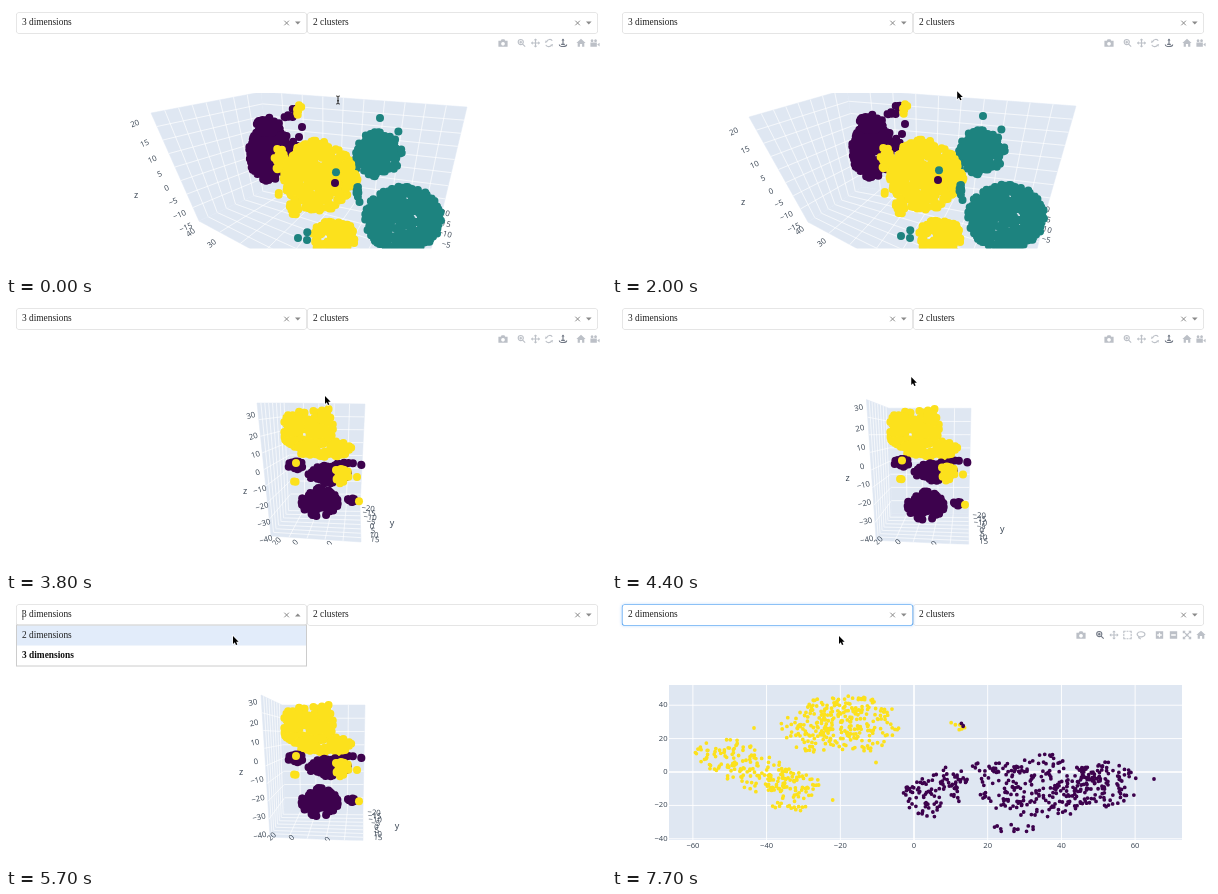
An HTML page with a canvas for the animation above (8 s loop, 600x268 px).

```html
<!DOCTYPE html>
<html lang="en">
<head>
<meta charset="utf-8">
<title>Cluster explorer</title>
<style>
  html, body { margin: 0; width: 100%; height: 100%; overflow: hidden; background: #fff; }
  canvas { display: block; }
</style>
</head>
<body>
<canvas id="stage" width="600" height="268"></canvas>
<script>
const g = document.getElementById('stage').getContext('2d');
const LOOP = 8000, SWAP = 2300, FLAT = 6900, OPEN = 4800, PICK = 5800;
const P = '#3d024d', Y = '#fce11c', T = '#1d837f', WALL = '#dfe7f2', INK = '#34404f';
const clamp = u => Math.max(0, Math.min(1, u));
const span = (t, a, b) => clamp((t - a) / (b - a));
const lerp = (a, b, u) => a + (b - a) * u;

let seed = 11;
function random() {
  seed = (seed * 1664525 + 1013904223) >>> 0;
  return seed / 4294967296;
}

// Unit-disc samples, enough of them to fill an ellipse of the given area
function cloud(area, power) {
  return Array.from({ length: 1 + Math.floor(area) }, () => {
    const a = random() * Math.PI * 2, r = random() ** power;
    return [r * Math.cos(a), r * Math.sin(a)];
  });
}

function discs(color, pts, x, y, rx, ry, r) {
  g.fillStyle = color;
  g.beginPath();
  for (const [dx, dy] of pts) {
    const px = x + dx * rx, py = y + dy * ry;
    g.moveTo(px + r, py);
    g.arc(px, py, r, 0, 7);
  }
  g.fill();
}

function text(str, x, y, font, color = INK, align = 'left', angle = 0) {
  g.save();
  g.translate(x, y);
  g.rotate(angle * Math.PI / 180);
  g.font = font;
  g.fillStyle = color;
  g.textAlign = align;
  g.textBaseline = 'middle';
  g.fillText(str, 0, 0);
  g.restore();
}
const SANS = '"Open Sans", sans-serif', SERIF = '"Liberation Serif", serif';

// ---- 3D scene ----
// box: left-top, back-top, right-top, left-bottom, back-bottom, right-bottom, front-bottom
// axes: x0, y0, x1, y1, label angle, spacing power
const zA = '20 15 10 5 0 −5 −10 −15', zB = '30 20 10 0 −10 −20 −30 −40';
const yTicks = '−20 −15 −10 −5 0 5 10 15';
const views = {
  wide: {
    box: [145, 107, 255, 86, 461, 101, 193, 215, 266, 181, 436, 206, 400, 327],
    z: [129, 118, 180, 222, -22, .85], left: [185, 227, 206, 238, -38, 1], right: [437, 207, 440, 239, 14, 1],
    zName: [130, 190], name: [470, 262], lines: [8, 10, 8],
    zText: zA, leftText: '40 30', rightText: '−20 −15 −10 −5', nameText: 'x'
  },
  wideTurned: {
    box: [137, 111, 235, 83, 464, 100, 196, 216, 250, 181, 434, 205, 405, 329],
    z: [122, 126, 182, 222, -24, .85], left: [188, 225, 210, 237, -38, 1], right: [431, 203, 434, 234, 14, 1],
    zName: [131, 197], name: [470, 262], lines: [8, 10, 8],
    zText: zA, leftText: '40 30', rightText: '−20 −15 −10 −5', nameText: 'x'
  },
  corner: {
    box: [245, 107, 322, 88, 375, 101, 265, 212, 319, 184, 356, 203, 303, 250],
    z: [232, 124, 258, 221, -18, .85], left: [262, 216, 279, 241, 45, 1], right: [358, 213, 331, 239, 40, 1],
    zName: [224, 187], name: [358, 241], lines: [8, 6, 8],
    zText: zB, leftText: yTicks, rightText: '−20 −10 0 10', nameText: 'x'
  },
  side: {
    box: [251, 101, 282, 101, 359, 102, 265, 234, 285, 205, 354, 205, 355, 240],
    z: [245, 114, 260, 238, -16, .92], left: [271, 240, 324, 242, -45, 1.5], right: [362, 207, 369, 238, 6, 1],
    zName: [239, 190], name: [386, 222], lines: [8, 5, 8],
    zText: zB, leftText: '20 0 0', rightText: yTicks, nameText: 'y'
  },
  sideLow: {
    box: [255, 97, 276, 107, 359, 107, 264, 239, 279, 213, 357, 213, 357, 243],
    z: [247, 105, 254, 238, -12, .96], left: [266, 239, 322, 242, -45, 1.5], right: [368, 215, 372, 240, 4, 1],
    zName: [235, 175], name: [391, 229], lines: [8, 5, 8],
    zText: zB, leftText: '20 0 0', rightText: yTicks, nameText: 'y'
  }
};

function mix(a, b, u) {
  const out = {};
  for (const k in a)
    out[k] = Array.isArray(a[k]) ? a[k].map((v, i) => lerp(v, b[k][i], u)) : u < .5 ? a[k] : b[k];
  return out;
}

function wall(a, b, c, d, nu, nv) {
  const at = (u, v) => [0, 1].map(i => lerp(lerp(a[i], b[i], u), lerp(d[i], c[i], u), v));
  g.beginPath();
  [a, b, c, d].forEach(p => g.lineTo(...p));
  g.closePath();
  g.fillStyle = g.strokeStyle = WALL;
  g.lineWidth = .5;
  g.fill();
  g.stroke();
  g.beginPath();
  for (let i = 1; i < nu; i++) { g.moveTo(...at(i / nu, 0)); g.lineTo(...at(i / nu, 1)); }
  for (let i = 1; i < nv; i++) { g.moveTo(...at(0, i / nv)); g.lineTo(...at(1, i / nv)); }
  g.strokeStyle = 'rgba(255,255,255,.85)';
  g.lineWidth = .8;
  g.stroke();
}

function ticks(labels, [x0, y0, x1, y1, angle, power]) {
  labels.split(' ').forEach((s, i, all) => {
    const u = (i / (all.length - 1)) ** power;
    text(s, lerp(x0, x1, u), lerp(y0, y1, u), '7.8px ' + SANS, INK, 'center', angle);
  });
}

function frame3d(v) {
  const [a, b, c, d, e, f, h] = Array.from({ length: 7 }, (_, i) => v.box.slice(2 * i, 2 * i + 2));
  const [nl, nb, nz] = v.lines.map(Math.round);
  wall(d, e, f, h, nl, nb);
  wall(a, b, e, d, nl, nz);
  wall(b, c, f, e, nb, nz);
  ticks(v.zText, v.z);
  ticks(v.leftText, v.left);
  ticks(v.rightText, v.right);
  text('z', ...v.zName, '9px ' + SANS, INK, 'center');
  text(v.nameText, ...v.name, '9px ' + SANS, INK, 'center');
}

const inner = r => Math.max(0, r - 3.5);
const fill3d = (rx, ry) => inner(rx) * inner(ry) / 3;

// color, x, y, rx, ry
const threeClusters = [
  [T, 372, 148, 26, 26], [T, 374, 112, 1, 1], [T, 393, 126, 6, 4], [T, 396, 143, 5, 9], [T, 350, 160, 6, 8],
  [P, 264, 147, 25, 32], [P, 262, 120, 16, 12], [P, 283, 110, 12, 5], [P, 290, 103, 8, 6],
  [P, 296, 121, 1, 1], [P, 293, 131, 1, 1], [P, 287, 141, 8, 9],
  [Y, 274, 153, 9, 16], [Y, 293, 104, 6, 10], [Y, 312, 170, 38, 39], [Y, 343, 170, 13, 18],
  [Y, 288, 201, 8, 12], [Y, 272, 188, 6, 5], [Y, 328, 232, 25, 22],
  [T, 397, 213, 42, 36], [T, 352, 190, 6, 13], [T, 330, 166, 3, 4], [T, 301, 226, 5, 5],
  [T, 301, 234, 1, 1], [T, 292, 232, 1, 1], [P, 329, 177, 1, 1]
].map(b => [...b, cloud(fill3d(b[3], b[4]), .5)]);
const drift = { [P]: [-3, -3], [Y]: [0, -1], [T]: [-3, -2] };

// color, ellipse in the corner view, ellipse in the side view
const twoClusters = [
  [P, 340, 155, 8, 8, 340, 163, 14, 6],
  [Y, 312, 130, 23, 26, 302, 128, 30, 23], [Y, 299, 124, 13, 12, 286, 122, 13, 15],
  [Y, 276, 136, 12, 9, 320, 114, 10, 11], [Y, 308, 157, 20, 12, 318, 147, 32, 12],
  [P, 318, 182, 27, 15, 322, 172, 24, 13], [P, 295, 181, 10, 14, 290, 164, 13, 8],
  [P, 316, 203, 14, 12, 314, 200, 22, 18], [P, 341, 148, 6, 5, 355, 163, 4, 4],
  [P, 335, 190, 10, 12, 345, 198, 7, 6],
  [Y, 342, 163, 6, 11, 336, 174, 11, 11], [Y, 297, 177, 5, 4, 289, 181, 6, 6],
  [Y, 290, 179, 1, 1, 290, 161, 1, 1], [Y, 316, 187, 5, 4, 353, 199, 1, 4],
  [Y, 306, 195, 1, 1, 330, 166, 4, 8], [Y, 294, 194, 1, 1, 351, 175, 1, 1]
].map(([c, ...n]) => [c, n, cloud(Math.max(fill3d(n[2], n[3]), fill3d(n[6], n[7])), .5)]);

function scene3d(t) {
  g.save();
  g.beginPath();
  g.rect(0, 87, 600, 155.5);
  g.clip();
  if (t < SWAP) {
    const u = span(t, 0, 800);
    frame3d(mix(views.wide, views.wideTurned, u));
    for (const [c, x, y, rx, ry, pts] of threeClusters)
      discs(c, pts, x + drift[c][0] * u, y + drift[c][1] * u, inner(rx), inner(ry), 4);
  } else {
    const u = span(t, 3000, 3800), v = span(t, 3800, 4500);
    frame3d(v ? mix(views.side, views.sideLow, v) : mix(views.corner, views.side, u));
    for (const [c, n, pts] of twoClusters) {
      const [x, y, rx, ry] = [0, 1, 2, 3].map(i => lerp(n[i], n[i + 4], u));
      const sink = n[5] > 190 ? 4 : n[5] > 155 ? -3 : 0;
      discs(c, pts, x, y + sink * v, inner(rx), inner(ry), 4);
    }
  }
  g.restore();
}

// ---- 2D scatter ----
const flatClusters = [
  [Y, 247, 126, 40, 29], [Y, 197, 133, 30, 22], [Y, 225, 112, 34, 14], [Y, 114, 157, 32, 17],
  [Y, 150, 176, 38, 18], [Y, 182, 187, 26, 16], [Y, 181, 208, 23, 5], [Y, 142, 130, 0, 0],
  [Y, 264, 165, 2, 1], [Y, 221, 201, 5, 1],
  [Y, 345, 127, 10, 5], [P, 351, 128, 5, 4],
  [P, 318, 199, 31, 20], [P, 338, 180, 18, 12], [P, 430, 190, 64, 29], [P, 493, 186, 33, 23],
  [P, 380, 169, 22, 5], [P, 435, 159, 10, 4], [P, 400, 230, 27, 4], [P, 542, 181, 0, 0]
].map(b => [...b, cloud(b[3] * b[4] / 8, .55)]);

function scene2d() {
  const px = v => 302 + v * 3.685, py = v => 174 - v * 1.67;
  const label = v => String(v).replace('-', '−');
  g.fillStyle = WALL;
  g.fillRect(57, 87, 513, 155);
  g.fillStyle = '#fff';
  for (let v = -60; v <= 60; v += 20) {
    const w = v ? .9 : 1.6;
    g.fillRect(px(v) - w / 2, 87, w, 155);
    text(label(v), px(v), 248, '7.6px ' + SANS, INK, 'center');
    g.fillStyle = '#fff';
  }
  for (let v = -40; v <= 40; v += 20) {
    const w = v ? .9 : 1.6;
    g.fillRect(57, py(v) - w / 2, 513, w);
    text(label(v), 55.5, py(v), '7.6px ' + SANS, INK, 'right');
    g.fillStyle = '#fff';
  }
  for (const [c, x, y, rx, ry, pts] of flatClusters) discs(c, pts, x, y, rx, ry, 1.9);
}

// ---- Toolbar: [filled path, stroked path] ----
const icons = {
  camera: ['M-5-2.5h2.5l1-1.5h3l1 1.5h2.5v6.5h-10zM0-1.2a2 2 0 1 0 .01 0z', ''],
  zoom: ['', 'M2-1a2.8 2.8 0 1 0-5.6 0a2.8 2.8 0 1 0 5.6 0M1.2 1.2L4 4M-2.3-1h3M-.8-2.5v3'],
  pan: ['M-5 0l2-2v4zM5 0l-2-2v4zM0-5l-2 2h4zM0 5l-2-2h4z', 'M-4 0h8M0-4v8'],
  orbit: ['M-4.5 0l1-3 2 2zM4.5 1l-1 3-2-2z', 'M-2.5-1.5c1-3 5-3 6-1M2.5 2.5c-1 2-5 2-6-.5'],
  turntable: ['M0-5l-1.6 2.4h3.2z', 'M0-4v5.5M-4 1.5c0 3 8 3 8 0M-2 1.5h4'],
  home: ['M0-4.5L5 0h-1.4v4h-2.4v-3h-2.4v3h-2.4v-4h-1.4z', ''],
  movie: ['M-5-.5h7v4.5h-7zM2.4 1.7l2.6-2v4zM-3.2-4a1.5 1.5 0 1 0 .01 0zM.6-4a1.5 1.5 0 1 0 .01 0z', ''],
  box: ['', 'M-4-2v-2h2M-1-4h2M2-4h2v2M4-1v2M4 2v2h-2M1 4h-2M-2 4h-2v-2M-4 1v-2'],
  lasso: ['', 'M-2 1.8c-4-2-2-5.3 2-5.3c5 0 6 4.5 1 5.5c-2 .3-4-.4-3.5 1c.3 1 2 0 2 1.5'],
  plus: ['M-4-4h8v8h-8zM-.7-2.5v1.8h-1.8v1.4h1.8v1.8h1.4v-1.8h1.8v-1.4h-1.8v-1.8z', ''],
  minus: ['M-4-4h8v8h-8zM-2.5-.7v1.4h5v-1.4z', ''],
  fit: ['M-1.3-1.3h2.6v2.6h-2.6z', 'M-4-1.8v-2.2h2.2M1.8-4h2.2v2.2M4 1.8v2.2h-2.2M-1.8 4h-2.2v-2.2M-4-4l8 8M4-4l-8 8']
};
for (const k in icons) icons[k] = icons[k].map(d => new Path2D(d));
const bar3d = { camera: 497, zoom: 515.5, pan: 529.5, orbit: 543, turntable: 557, home: 575, movie: 589 };
const bar2d = { camera: 469, zoom: 488, pan: 502, box: 515.5, lasso: 529, plus: 547.5, minus: 561.5, fit: 575, home: 589 };

function toolbar(bar, active) {
  for (const k in bar) {
    g.save();
    g.translate(bar[k], 37);
    g.scale(.92, .92);
    g.fillStyle = g.strokeStyle = k === active ? '#707784' : '#bcc0c7';
    g.lineWidth = 1.2;
    g.fill(icons[k][0], 'evenodd');
    g.stroke(icons[k][1]);
    g.restore();
  }
}

// ---- Dropdowns ----
function dropdown(x, value, open, focus) {
  g.save();
  g.beginPath();
  g.roundRect(x + .5, 7, 290, 20, 2);
  g.strokeStyle = focus ? '#3d95ee' : '#ccc';
  g.lineWidth = focus ? 1.2 : 1;
  if (focus) { g.shadowColor = 'rgba(0,126,255,.5)'; g.shadowBlur = 3; }
  g.stroke();
  g.shadowBlur = 0;
  g.fillStyle = '#fff';
  g.fill();
  text(value, x + 6, 17, '9.4px ' + SERIF, '#222');
  g.strokeStyle = g.fillStyle = '#8a8a8a';
  g.lineWidth = 1;
  g.beginPath();
  g.moveTo(x + 268.3, 14.7); g.lineTo(x + 272.9, 19.3);
  g.moveTo(x + 272.9, 14.7); g.lineTo(x + 268.3, 19.3);
  g.stroke();
  const d = open ? -1.5 : 1.5;
  g.beginPath();
  g.moveTo(x + 279, 17 - d); g.lineTo(x + 284.6, 17 - d); g.lineTo(x + 281.8, 17 + d);
  g.fill();
  g.restore();
}

function menu(hover) {
  g.fillStyle = '#fff';
  g.fillRect(10.5, 27, 290, 41);
  g.fillStyle = '#e2ecfa';
  g.fillRect(11, hover ? 27.5 : 47.5, 289, 20);
  g.strokeStyle = '#ccc';
  g.lineWidth = 1;
  g.strokeRect(10.5, 27, 290, 41);
  text('2 dimensions', 16, 37.3, '9.4px ' + SERIF, '#222');
  text('3 dimensions', 16, 57.5, 'bold 9.4px ' + SERIF, '#111');
  g.fillStyle = '#333';
  g.fillRect(16.5, 12, .8, 10);
}

// ---- Pointer: time, x, y ----
const route = [
  [0, 332, 94], [100, 333, 96], [1000, 333, 96], [1400, 338, 39], [1800, 345, 86], [2900, 346, 82],
  [3400, 334, 40], [3800, 319, 94], [4300, 319, 94], [4700, 240, 18], [5300, 238, 25], [5600, 227, 38], [LOOP, 227, 38]
];
const arrow = new Path2D('M0 0v9l2-1.9 1.4 3.2 1.6-.7-1.4-3.1h2.8z');
const beam = new Path2D('M-1.8-4q1.8 0 1.8 1v6q0 1-1.8 1M1.8-4q-1.8 0-1.8 1M1.8 4q-1.8 0-1.8-1M-1 .8h2');

function pointer(t) {
  const i = route.findIndex(k => k[0] > t), a = route[i - 1], b = route[i];
  const u = span(t, a[0], b[0]), x = lerp(a[1], b[1], u), y = lerp(a[2], b[2], u);
  g.save();
  g.translate(x, y);
  if (t < 100 || y < 27) {
    g.strokeStyle = '#222';
    g.lineWidth = 1;
    g.stroke(beam);
  } else {
    g.scale(.88, .88);
    g.strokeStyle = '#fff';
    g.lineWidth = 1.4;
    g.stroke(arrow);
    g.fillStyle = '#000';
    g.fill(arrow);
  }
  g.restore();
}

function draw(now) {
  const t = Math.floor(now % LOOP / 100) * 100;
  const open = t >= OPEN && t < PICK, flat = t >= FLAT;
  g.fillStyle = '#fff';
  g.fillRect(0, 0, 600, 268);
  flat ? scene2d() : scene3d(t);
  if (t < 4700 || t >= PICK) flat ? toolbar(bar2d, 'zoom') : toolbar(bar3d, 'turntable');
  dropdown(301, '2 clusters', false, false);
  dropdown(10, t < PICK ? '3 dimensions' : '2 dimensions', open, t >= PICK);
  if (open) menu(t >= 5500);
  pointer(t);
  requestAnimationFrame(draw);
}
requestAnimationFrame(draw);
</script>
</body>
</html>
```
